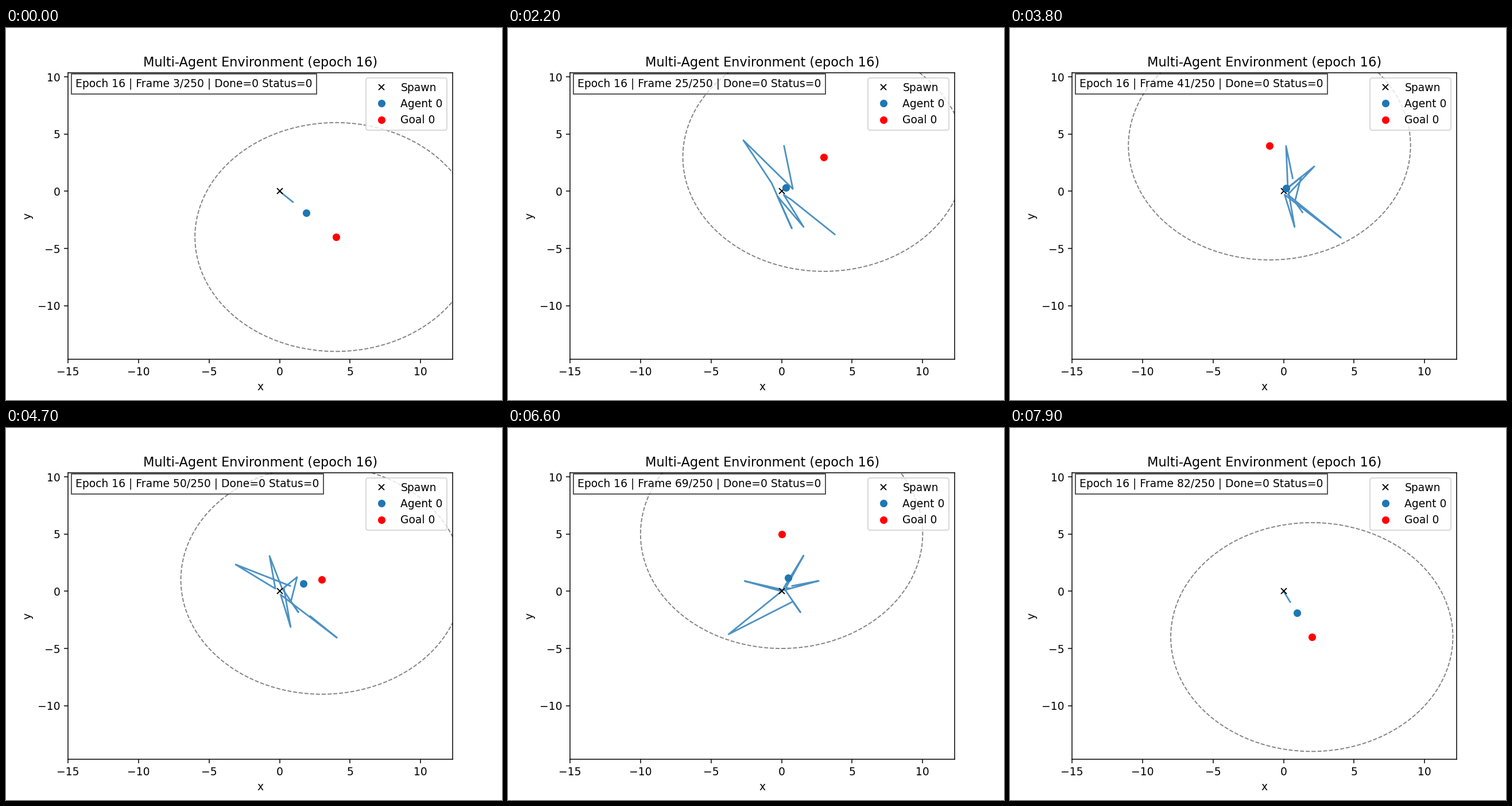
Recreate the animation shown at these times as a matplotlib script. Size 864x648 px, loop 8000 ms.

```python
import numpy as np
import matplotlib.pyplot as plt
from matplotlib.animation import FuncAnimation
from matplotlib.patches import Circle

plt.rcParams["font.family"] = "DejaVu Sans"

FRAMES, STEP_MS = 80, 100
FIRST = 2       # moves already made when the loop starts
TRAIL = 20      # points kept in the trail
STRIDE = 0.94   # longest move along one axis
REACH = 1.17    # the goal is taken on the next move once this close
SPAWN = 0.3     # usual first distance from the spawn point


def chase(goal, start=None):
    """Walk straight at the goal, one stride per step; return all positions."""
    goal = np.array(goal, float)
    pos = SPAWN * goal / abs(goal).max() if start is None else np.array(start, float)
    steps = [pos]
    while (far := abs(goal - pos).max()) > REACH:
        pos = pos + STRIDE * (goal - pos) / far
        steps.append(pos)
    return steps


# Goals in order, each with a start where the agent spawns off its course.
RUNS = [
    ((4, -4), (0, 0)), ((1, -1), (.7, -.75)), ((2, -4),), ((1, -4), (-.3, -.43)),
    ((-3, 5), (-.7, .7)), ((0, 5), (.8, .2)), ((3, 3),), ((5, -5),),
    ((1, -4),), ((2, 2),), ((2, -3), (.8, -.9)), ((-1, 4), (.17, .27)),
    ((-4, 3),), ((3, 1), (.75, .47)), ((-3, 1), (.2, .1)), ((-4, -4), (0, 0)),
    ((2, -3), (.8, -.9)), ((2, 4),), ((1, 1),), ((0, 5), (.6, .25)),
    ((-1, -3),), ((4, 2),), ((2, -4), (0, 0)),
]

walks = [chase(*run) for run in RUNS]
path = np.vstack(walks)
goals = np.repeat([run[0] for run in RUNS], [len(w) for w in walks], axis=0)
reset = len(path) - len(walks[-1])   # the last run begins with a cleared trail

fig, ax = plt.subplots(figsize=(6.4, 4.8), dpi=135)
ax.set(xlim=(-15, 12.25), ylim=(-14.67, 10.37), xlabel="x", ylabel="y",
       title="Multi-Agent Environment (epoch 16)")
ax.set_xticks(range(-15, 11, 5))
ax.set_yticks(range(-10, 11, 5))

trail, = ax.plot([], [], color="tab:blue", lw=1.5, alpha=0.8)
ax.plot([0], [0], "kx", ms=5.5, label="Spawn")
agent, = ax.plot([], [], "o", color="tab:blue", label="Agent 0")
goal, = ax.plot([], [], "o", color="red", label="Goal 0")
bounds = ax.add_patch(Circle((0, 0), 10, fill=False, ec="gray", ls="--", lw=1))
status = ax.text(0.02, 0.98, "", transform=ax.transAxes, va="top",
                 bbox=dict(facecolor="white", alpha=0.7))
ax.legend(loc="upper right")


def update(i):
    now = i + FIRST
    start = max(now - TRAIL, reset if now >= reset else 0)
    trail.set_data(*path[start:now].T)
    agent.set_data(*path[now:now + 1].T)
    goal.set_data(*goals[now:now + 1].T)
    bounds.center = tuple(goals[now])
    status.set_text(f"Epoch 16 | Frame {now + 1}/250 | Done=0 Status=0")
    return trail, agent, goal, bounds, status


anim = FuncAnimation(fig, update, frames=FRAMES, interval=STEP_MS, repeat=True)
plt.show()
```
